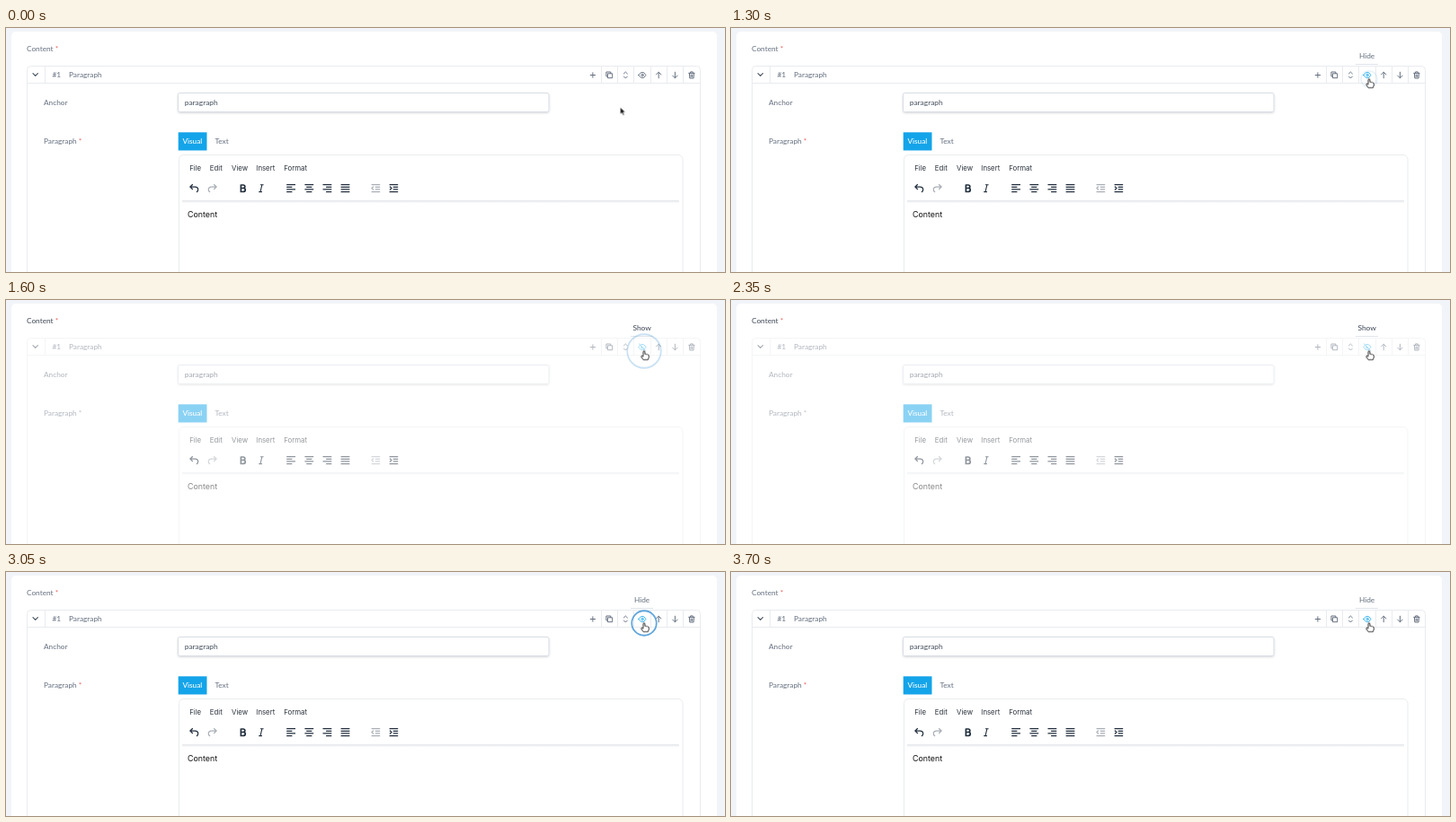
Animation of 800x272 px, one loop 3850 ms. Source, as an HTML page:

```html
<!DOCTYPE html>
<html lang="en">
<head>
<meta charset="utf-8">
<title>Toggle block visibility</title>
<style>
html, body { margin: 0; width: 100%; height: 100%; overflow: hidden; background: #f1f4f8; }
svg { display: block; width: 800px; height: 272px; }
text { font: 500 8.25px Lato, "Open Sans", sans-serif; fill: #6f7988; }
.menu text { font: 7.8px Inter, sans-serif; fill: #2b323c; }
.body-text { font: 8.9px Inter, sans-serif; fill: #111; }
.red { fill: #ec5a5a; }
.frame { fill: none; stroke: #e8ebef; }
.icons { fill: none; stroke: #667080; stroke-width: 1; stroke-linecap: round; stroke-linejoin: round; }
.tools { fill: none; stroke: #222f3e; stroke-width: 1.25; }
.off { stroke: #a9afb6; }

/* every animation shares one loop */
.a { animation: 3850ms linear infinite; }
.swap { animation-timing-function: step-end; }
.block { animation-name: dim; }
.label { animation-name: label; }
.star { animation-name: star; }
.when-shown { animation-name: shown; }
.when-hidden { animation-name: hidden; }
.eye { animation-name: eye; }
.arrow { animation-name: arrow; }
.hand { animation-name: hand; }
.tip { animation-name: tip; }
.ripple { animation-name: ripple; fill: none; stroke: #4f9cd8; stroke-width: 1.8; }
.pointer { animation-name: move; }

/* clicks take effect at 1400 ms and 3000 ms */
@keyframes dim { 0%, 77.92% { opacity: 1 } 36.36% { opacity: .5 } }
@keyframes label { 0%, 77.92% { fill: #6f7988 } 36.36% { fill: #4b5361 } }
@keyframes star { 0%, 77.92% { fill: #ec5a5a } 36.36% { fill: #7d7f8a } }
@keyframes shown { 0%, 77.92% { opacity: 1 } 36.36% { opacity: 0 } }
@keyframes hidden { 0%, 77.92% { opacity: 0 } 36.36% { opacity: 1 } }
/* hover starts at 400 ms */
@keyframes eye { 0% { stroke: #667080 } 10.39%, 100% { stroke: #2fb0ee } }
@keyframes arrow { 0% { opacity: 1 } 10.39%, 100% { opacity: 0 } }
@keyframes hand { 0% { opacity: 0 } 10.39%, 100% { opacity: 1 } }
@keyframes tip { 0%, 15% { opacity: 0 } 21%, 100% { opacity: 1 } }
@keyframes move {
  0%, 1.3% { transform: translate(683.5px, 88.3px); animation-timing-function: cubic-bezier(.45, 0, .55, 1) }
  14.29%, 100% { transform: translate(710px, 56.8px) }
}
@keyframes ripple {
  0%, 33.75% { r: 9px; opacity: 0 }
  33.76% { r: 9px; opacity: .12 }
  37.66% { r: 13.7px; opacity: .9 }
  41.56% { r: 18.7px; opacity: .3 }
  43.5% { r: 21px; opacity: 0 }
  75.3% { r: 9px; opacity: 0 }
  75.31% { r: 9px; opacity: .4 }
  79.22% { r: 13.7px; opacity: .9 }
  83.12% { r: 18.7px; opacity: .3 }
  85.06%, 100% { r: 21px; opacity: 0 }
}
</style>
</head>
<body>
<svg viewBox="0 0 800 272">
  <defs>
    <filter id="soft" x="-20%" y="-40%" width="140%" height="200%">
      <feDropShadow dx="0" dy="1" stdDeviation="1" flood-color="#334155" flood-opacity=".2"/>
    </filter>
    <linearGradient id="fade" x2="0" y2="1">
      <stop stop-color="#dfe2e6"/><stop offset="1" stop-color="#fff"/>
    </linearGradient>
  </defs>

  <rect width="800" height="272" fill="#f1f4f8"/>
  <rect x="6" y="4" width="785" height="290" rx="5" fill="#fff"/>
  <text x="23" y="25.8"><tspan class="a swap label">Content</tspan> <tspan class="red">*</tspan></text>

  <g class="a swap block">
    <rect class="frame" x="23.5" y="42.5" width="749" height="260" rx="4"/>
    <path class="frame" d="M24 61.5H772M43.5 43V61M662.5 43V61M680.5 43V61M698.5 43V61M717.5 43V61M735.5 43V61M753.5 43V61"/>
    <text x="51.5" y="54.8">#1</text>
    <text x="70" y="54.8">Paragraph</text>

    <g class="icons">
      <path d="M30 50.7l2.7 2.7 2.7-2.7" stroke="#4b5563" stroke-width="1.2"/>
      <path d="M650.2 52.5h5.4M652.9 49.8v5.4"/>
      <path d="M669.8 50.8h4.9v4.9h-4.9zM669.6 53.9h-1.7V49h4.9v1.6"/>
      <path d="M687.4 51l2-2 2 2M687.4 54l2 2 2-2"/>
      <g class="a swap eye">
        <g class="a swap when-shown">
          <path d="M703.9 52.5C706 48.4 709.8 48.4 711.9 52.5C709.8 56.6 706 56.6 703.9 52.5z"/>
          <circle cx="707.9" cy="52.5" r="1.25"/>
        </g>
        <g class="a swap when-hidden">
          <path d="M705.4 50.5Q704.4 51.4 703.9 52.5C705.3 55.2 707.6 56.2 709.8 55.2M706.7 49.6C708.9 49 710.8 50.3 711.9 52.5Q711.4 53.5 710.7 54.2M707 51.6a1.25 1.25 0 0 0 1.8 1.8M704.4 49l7 7"/>
        </g>
      </g>
      <path d="M726.2 55.8v-6.6M723.5 51.9l2.7-2.7 2.7 2.7"/>
      <path d="M744.4 49.2v6.6M741.7 53.1l2.7 2.7 2.7-2.7"/>
      <path d="M759.7 50.3h6.4M760.4 50.4l.4 5.6h4.2l.4-5.6M761.6 50.2V48.9h2.6v1.3M762.1 52v2.5M763.7 52v2.5"/>
    </g>

    <text x="42" y="86">Anchor</text>
    <rect x="191.5" y="72.5" width="412.5" height="21" rx="2" fill="#fff" stroke="#d8dde4" filter="url(#soft)"/>
    <text x="198.7" y="86" style="font-size:8.4px;fill:#515b69">paragraph</text>

    <text x="42" y="129">Paragraph <tspan class="a swap star">*</tspan></text>
    <rect x="191.7" y="116.3" width="31.8" height="20.2" fill="#14a4e9"/>
    <text x="196.4" y="129.2" style="fill:#fff">Visual</text>
    <text x="232.4" y="129.2">Text</text>

    <rect class="frame" x="192.5" y="141.5" width="560.5" height="150" rx="5"/>
    <rect x="196" y="192.2" width="553" height="3" fill="url(#fade)"/>
    <g class="menu">
      <text x="204.2" y="158.6">File</text>
      <text x="226.8" y="158.6">Edit</text>
      <text x="251" y="158.6">View</text>
      <text x="278.3" y="158.6">Insert</text>
      <text x="309.2" y="158.6">Format</text>
    </g>
    <g class="tools">
      <path id="undo" d="M207.8 174.2l-2.9 2.9 2.9 2.9M205 177.1h5.2c4.4 0 4.4 4.4 1.7 5.9"/>
      <path class="off" d="M231.2 174.2l2.9 2.9-2.9 2.9M234 177.1h-5.2c-4.4 0-4.4 4.4-1.7 5.9"/>
      <path d="M261.4 175h2.4c2.7 0 2.7 3.5 0 3.5h-2.4M263.8 178.5c3.3 0 3.3 4 0 4h-2.4V174.6" stroke-width="1.7"/>
      <path d="M283 174.7h3.6M281.3 182.6h3.6M284.9 174.7l-1.9 7.9" stroke-width="1.1"/>
      <path d="M312.2 174.7h9.8M312.2 177.3h6.2M312.2 179.9h9.8M312.2 182.5h6.2"/>
      <path d="M332.4 174.7h9.8M334.2 177.3h6.2M332.4 179.9h9.8M334.2 182.5h6.2"/>
      <path d="M352.5 174.7h9.8M356.1 177.3h6.2M352.5 179.9h9.8M356.1 182.5h6.2"/>
      <path d="M372.6 174.7h9.8M372.6 177.3h9.8M372.6 179.9h9.8M372.6 182.5h9.8"/>
      <path class="off" d="M406.6 174.7h9.6M410.8 177.3h5.4M410.8 179.9h5.4M406.6 182.5h9.6M409 176.7l-2 1.9 2 1.9"/>
      <path d="M426.6 174.7h9.6M430.8 177.3h5.4M430.8 179.9h5.4M426.6 182.5h9.6M427 176.7l2 1.9-2 1.9"/>
    </g>
    <text class="body-text" x="202" y="211.2">Content</text>
  </g>

  <g class="a tip">
    <rect x="693" y="22" width="29" height="18" rx="3" fill="#fff"/>
    <path d="M695 40.5H720" stroke="#dfe3e9"/>
    <text class="a swap when-shown" x="698.9" y="34">Hide</text>
    <text class="a swap when-hidden" x="697.4" y="34" style="font-size:8.4px;fill:#4b5361">Show</text>
  </g>

  <circle class="a ripple" cx="710" cy="57" r="9"/>

  <g class="a pointer">
    <path class="a swap arrow" d="M0 0V7.8L1.8 6.2L3.1 9.1L4.5 8.5L3.2 5.7H5.6z" fill="#111" stroke="#fff" stroke-width=".6"/>
    <path class="a swap hand" d="M-1 .4Q0-.6 .9 .4V3.5Q1.9 2.9 2.5 3.8Q3.6 3.2 4.1 4.3Q5.3 4 5.3 5.3V7.2L4.3 9.8H-.9L-3.3 6.3Q-3.2 4.9-1.9 5.5L-1 6.3z" fill="#fff" stroke="#222" stroke-width=".9" stroke-linejoin="round"/>
  </g>
</svg>
</body>
</html>
```
